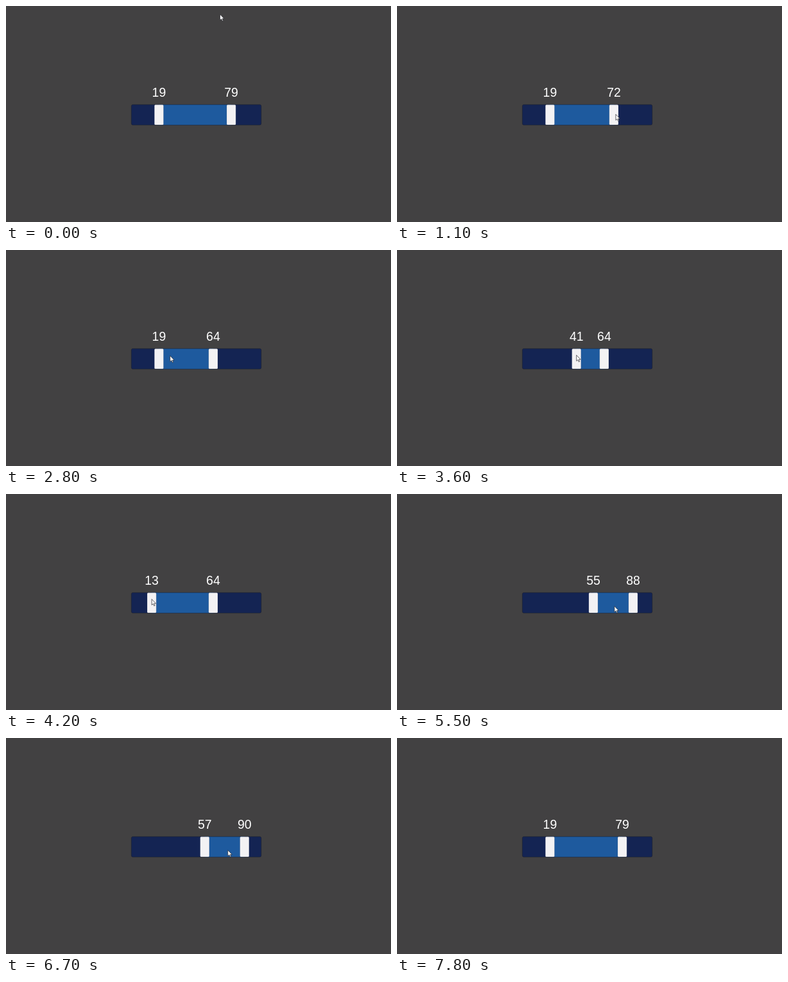
An HTML page for the animation above (8000 ms loop, 600 by 338 pixels).

```html
<!DOCTYPE html>
<html lang="en">
<head>
<meta charset="utf-8">
<title>Range slider</title>
<style>
  html, body { margin: 0; width: 100%; height: 100%; overflow: hidden; background: #424142; }
  svg { display: block; width: 100vw; height: 100vh; }
  text { font: 19.4px "Liberation Sans", Arial, sans-serif; fill: #fff; text-anchor: middle; }
  .knob { fill: #f3f2f4; stroke: #14244f; stroke-opacity: .35; stroke-width: .5; }
</style>
</head>
<body>
<svg viewBox="0 0 600 338" preserveAspectRatio="none">
  <rect x="195.3" y="154.3" width="202.5" height="32" rx="2.5" fill="#142453"/>
  <rect id="range" y="154.3" height="32" fill="#1e5a9e"/>
  <rect x="195.3" y="154.3" width="202.5" height="32" rx="2.5" fill="none" stroke="#17191f" stroke-opacity=".5" stroke-width=".8"/>
  <g id="low"><rect class="knob" x="-7.1" y="154.6" width="14.2" height="31.4" rx="1.5"/><text y="142"></text></g>
  <g id="high"><rect class="knob" x="-7.1" y="154.6" width="14.2" height="31.4" rx="1.5"/><text y="142"></text></g>
  <path id="cursor" d="M0 0V9.2L2.1 7.3 3.6 10.6 5 10 3.6 6.8H6.4Z" fill="#fff" stroke="#26262c" stroke-width=".7" stroke-linejoin="round"/>
</svg>
<script>
  const LOOP = 8000, STEP = 100, RESET = 7800, CURSOR_GONE = 7300, LEAD = 40;
  const $ = id => document.getElementById(id);
  const toX = value => 202.7 + 1.878 * value;

  function ease(t, from, to) {
    const p = Math.min(1, Math.max(0, (t - from) / (to - from)));
    return p * p * (3 - 2 * p);
  }

  // Drag the high handle, then the low one, then the whole range.
  function sliderAt(t) {
    const high = 79 - 18.6 * ease(t, 800, 1500) + 26.2 * ease(t, 1500, 2000) - 22.6 * ease(t, 2000, 2600);
    const low = 19 + 22 * ease(t, 2900, 3600) - 28 * ease(t, 3600, 4200) + 18 * ease(t, 4200, 4600);
    const shift = 25 * ease(t, 5200, 5400) - 51 * ease(t, 5450, 6100) + 52 * ease(t, 6100, 6700);
    return { low: Math.round(low + shift), high: Math.round(high + shift), exactLow: low + shift };
  }

  // The pointer glides from one grip to the next and follows whatever it holds.
  function cursorAt(t) {
    const { low, high } = sliderAt(t);
    const glide = (a, b, from, to) => a.map((v, i) => v + (b[i] - v) * ease(t, from, to));
    const highGrip = [toX(high) + 3, 169.5];
    const lowGrip = [toX(low), 164.5];
    const rangeGrip = [toX(sliderAt(t + LEAD).exactLow) + 36, 175.5];
    let point = glide([333.5, 13], highGrip, 0, 500);
    point = glide(point, lowGrip, 2600, 2880);
    point = glide(point, rangeGrip, 4600, 4900);
    return glide(point, [350, -14], 6800, 7300);
  }

  function placeHandle(id, value) {
    $(id).setAttribute("transform", `translate(${toX(value)} 0)`);
    $(id).lastChild.textContent = value;
  }

  function draw(t) {
    const { low, high } = sliderAt(t >= RESET ? 0 : t);
    placeHandle("low", low);
    placeHandle("high", high);
    $("range").setAttribute("x", toX(low));
    $("range").setAttribute("width", toX(high) - toX(low));
    $("cursor").setAttribute("transform", `translate(${cursorAt(t)})`);
    $("cursor").setAttribute("visibility", t < CURSOR_GONE ? "visible" : "hidden");
  }

  const start = performance.now();
  function tick() {
    const t = (performance.now() - start) % LOOP;
    draw(Math.floor(t / STEP) * STEP);
    requestAnimationFrame(tick);
  }
  tick();
</script>
</body>
</html>
```
